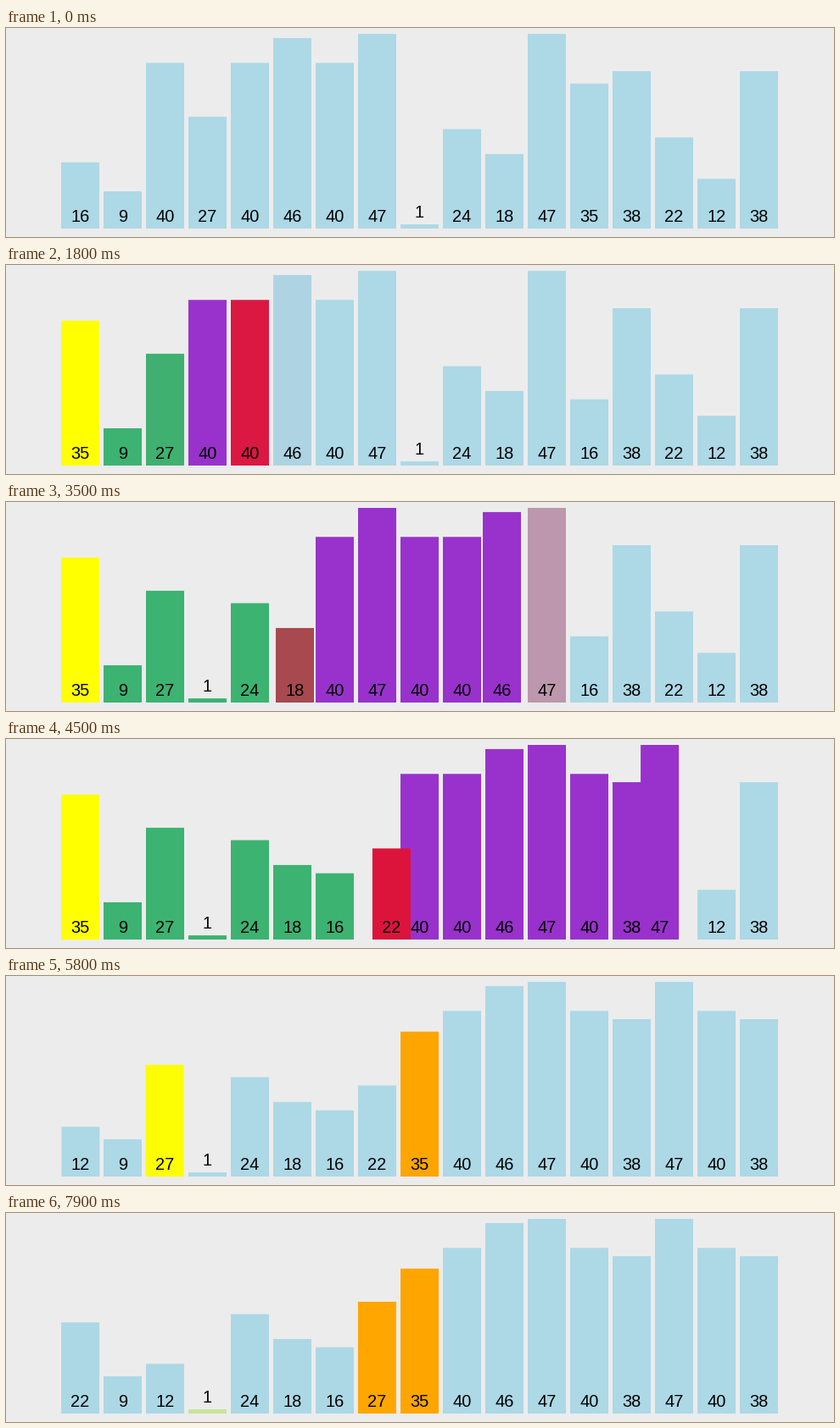
A matplotlib script that plays this animation: 976 by 247 pixels, repeating every 8 s.

```python
import matplotlib.pyplot as plt
import numpy as np
from matplotlib.animation import FuncAnimation
from matplotlib.colors import to_rgb
from matplotlib.patches import Rectangle

W, H, DPI = 976, 247, 100
LEFT, PITCH, BAR, FLOOR = 65, 50, 45, 237
SCALE = 230 / 47
FRAMES, INTERVAL = 80, 100
FADE, CUT = 183, 0.835  # transition length in ms, share done when the next one takes over

VALUES = [16, 9, 40, 27, 40, 46, 40, 47, 1, 24, 18, 47, 35, 38, 22, 12, 38]
N = len(VALUES)

IDLE, PIVOT, CHECK = "lightblue", "yellow", "crimson"
SMALL, LARGE, SORTED = "mediumseagreen", "darkorchid", "orange"


def quick_sort_steps(runs):
    """Target x and colour of every bar after each step of the sort."""
    order = list(range(N))
    color = [IDLE] * N
    steps = []

    def push():
        goal = np.empty((N, 4))
        for slot, bar in enumerate(order):
            goal[bar] = (LEFT + PITCH * slot, *to_rgb(color[bar]))
        steps.append(goal)

    def swap(i, j):
        if i != j:
            order[i], order[j] = order[j], order[i]
            push()

    push()
    for lo, hi, chosen in runs:
        pivot = order[chosen]
        color[pivot] = PIVOT
        push()
        swap(lo, chosen)
        store = lo
        for i in range(lo + 1, hi + 1):
            bar = order[i]
            color[bar] = CHECK
            push()
            if VALUES[bar] < VALUES[pivot]:
                store += 1
                swap(i, store)
                color[bar] = SMALL
            else:
                color[bar] = LARGE
        push()
        swap(lo, store)
        color = [SORTED if c == SORTED else IDLE for c in color]
        color[pivot] = SORTED
        push()
    return steps


# slot range and chosen pivot slot of each partition
rest, *goals = quick_sort_steps([(0, 16, 12), (0, 7, 2), (0, 6, 3)])

# the steps run at a slightly uneven pace
starts = np.interp(range(41),
                   [0, 7, 14, 16, 21, 24, 29, 36, 40],
                   [470, 1769, 3064, 3420, 4359, 4870, 5782, 7065, 7820])


def ease(t):
    return 4 * t**3 if t < 0.5 else 1 - 4 * (1 - t)**3


def pose(ms):
    shown = rest
    for start, goal in zip(starts, goals):
        if ms <= start:
            break
        shown = shown + (goal - shown) * ease(min((ms - start) / FADE, CUT))
    return shown


fig = plt.figure(figsize=(W / DPI, H / DPI), dpi=DPI, facecolor="#ececec")
ax = fig.add_axes([0, 0, 1, 1])
ax.set(xlim=(0, W), ylim=(H, 0))
ax.axis("off")

bars, labels = [], []
for i, value in enumerate(VALUES):
    height = value * SCALE
    bar = Rectangle((0, FLOOR - height), BAR, height, lw=0, zorder=2 * i + 1)
    bar.set_snap(False)
    bars.append(ax.add_patch(bar))
    base = FLOOR - 8 - (height if height < 10 else 0)
    labels.append(ax.text(0, base, str(value), ha="center", va="baseline",
                          family="Liberation Sans", size=20 * 72 / DPI,
                          color="black", zorder=2 * i + 2))


def draw(frame):
    for bar, label, (x, *rgb) in zip(bars, labels, pose(frame * INTERVAL)):
        bar.set_x(x)
        bar.set_facecolor(np.clip(rgb, 0, 1))
        label.set_x(x + BAR / 2)
    return bars + labels


anim = FuncAnimation(fig, draw, frames=FRAMES, interval=INTERVAL,
                     init_func=lambda: draw(0), repeat=True, repeat_delay=0)
plt.show()
```
